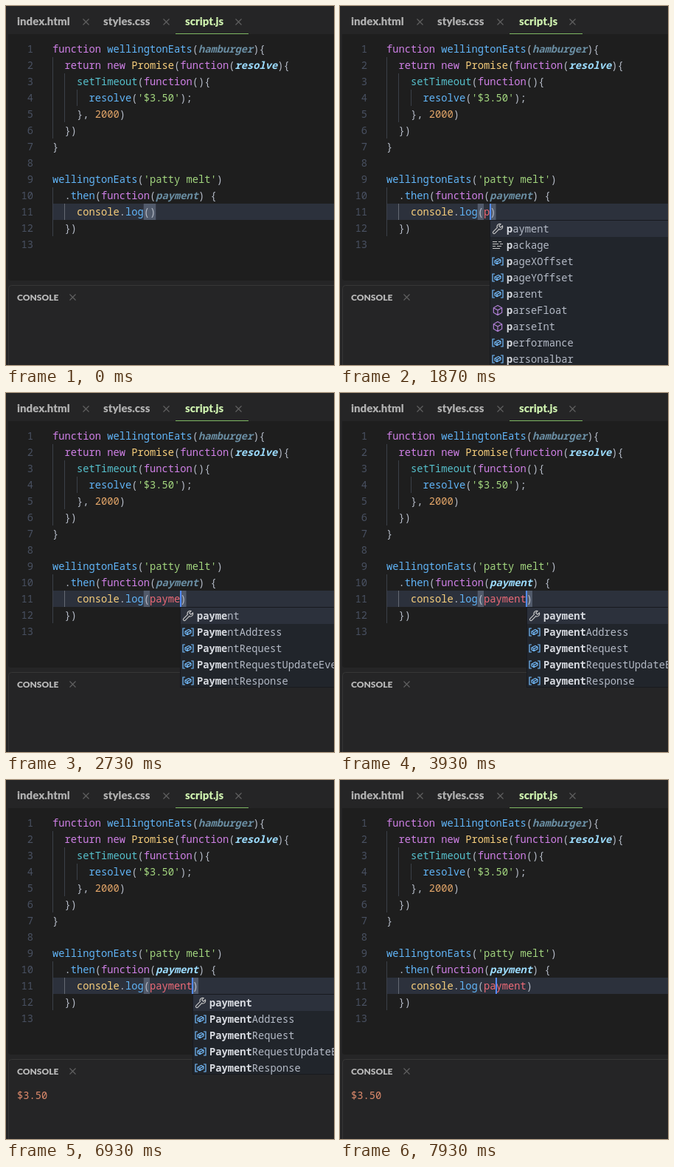
These frames come from a looping animation (445x485 px, 8 s). An HTML page with a canvas:

```html
<!DOCTYPE html>
<html lang="en">
<head>
<meta charset="utf-8">
<title>Promise demo</title>
<style>
html, body { margin: 0; width: 100%; height: 100%; overflow: hidden; background: #252526; }
canvas { display: block; width: 445px; height: 485px; }
</style>
</head>
<body>
<canvas id="stage"></canvas>
<script>
const W = 445, H = 485, LOOP = 8000;
const CH = 8.25, ROW = 22, LEFT = 63, TOP = 47;
const MONO = '13.75px "Noto Sans Mono", monospace';
const UI = 'Lato, sans-serif';
const C = {
  page: '#252526', editor: '#1e1e1e', line: '#2c313c', edge: '#363636',
  popup: '#21252b', border: '#181a1f', bracket: '#515a6b',
  plain: '#b4bac6', key: '#cf80e6', fn: '#61b5f8', type: '#f8cf7c',
  cyan: '#56c0cc', str: '#a3d67f', num: '#e0a468', red: '#ef6b78',
  arg: '#9cdcfe', dim: '#6a8ea3', lineNo: '#495162', caret: '#528bff'
};

const canvas = document.getElementById('stage');
const ctx = canvas.getContext('2d');
const dpr = window.devicePixelRatio || 1;
canvas.width = W * dpr;
canvas.height = H * dpr;

const colX = col => LEFT + col * CH;
const rowY = n => TOP + (n - 1) * ROW;

// Each token is [style, text]; each line is [indent, ...tokens].
const code = {
  1: [0, ['key', 'function '], ['fn', 'wellingtonEats'], ['plain', '('], ['dim', 'hamburger'], ['plain', '){']],
  2: [2, ['key', 'return new '], ['type', 'Promise'], ['plain', '('], ['key', 'function'], ['plain', '('], ['arg', 'resolve'], ['plain', '){']],
  3: [4, ['cyan', 'setTimeout'], ['plain', '('], ['key', 'function'], ['plain', '(){']],
  4: [6, ['fn', 'resolve'], ['plain', '('], ['str', "'$3.50'"], ['plain', ');']],
  5: [4, ['plain', '}, '], ['num', '2000'], ['plain', ')']],
  6: [2, ['plain', '})']],
  7: [0, ['plain', '}']],
  9: [0, ['fn', 'wellingtonEats'], ['plain', '('], ['str', "'patty melt'"], ['plain', ')']],
  12: [2, ['plain', '})']]
};

// [time, characters of "payment" typed]
const keys = [[1870, 1], [2130, 2], [2330, 3], [2530, 4], [2730, 5], [2800, 6], [2930, 7]];

const payItems = ['payment', 'PaymentAddress', 'PaymentRequest', 'PaymentRequestUpdateEvent', 'PaymentResponse'];
const lists = {
  1: ['payment', 'package', 'pageXOffset', 'pageYOffset', 'parent', 'parseFloat', 'parseInt', 'performance', 'personalbar'],
  2: ['payment', 'package', 'pageXOffset', 'pageYOffset', 'parent', 'parseFloat', 'parseInt', 'PannerNode', 'Path2D'],
  3: [...payItems, 'PerformanceEntry', 'PluginArray', 'PerformanceEntryList', 'PerformanceObserverEntryList']
};

function rect(x, y, w, h, color) {
  ctx.fillStyle = color;
  ctx.fillRect(x, y, w, h);
}

function text(str, x, y, color, font = MONO) {
  ctx.font = font;
  ctx.fillStyle = color;
  ctx.fillText(str, x, y);
}

function stroke(color, width, ...paths) {
  ctx.strokeStyle = color;
  ctx.lineWidth = width;
  ctx.beginPath();
  for (const [x, y, ...rest] of paths) {
    ctx.moveTo(x, y);
    for (let i = 0; i < rest.length; i += 2) ctx.lineTo(rest[i], rest[i + 1]);
  }
  ctx.stroke();
}

function panel(x, y, w, h, fill, edge) {
  ctx.beginPath();
  ctx.roundRect(x, y, w, h, 4);
  ctx.fillStyle = fill;
  ctx.fill();
  if (edge) {
    ctx.strokeStyle = edge;
    ctx.lineWidth = 1;
    ctx.stroke();
  }
}

function cross(x, y) {
  stroke('#626262', 1.1, [x - 4, y - 4, x + 4, y + 4], [x + 4, y - 4, x - 4, y + 4]);
}

function tokens(n, [indent, ...parts]) {
  let col = indent;
  for (const [style, str] of parts) {
    const slant = style === 'arg' || style === 'dim';
    text(str, colX(col), rowY(n) + 16, C[style], (slant ? 'italic 600 ' : '500 ') + MONO);
    col += str.length;
  }
}

function guide(col, from, to, color = '#3b4048') {
  rect(Math.floor(colX(col)), rowY(from), 1, (to - from + 1) * ROW, color);
}

function drawChrome() {
  rect(0, 0, W, H, C.page);
  panel(3, 38, W + 10, 333, C.editor);
  rect(3, 38, 8, 8, C.editor);
  panel(3.5, 377.5, W + 10, H, C.page, C.edge);

  const tabs = [['index.html', 15, 108.5], ['styles.css', 132, 217.5], ['script.js', 243, 315.5]];
  tabs.forEach(([name, x, closeX], i) => {
    text(name, x, 26, i === 2 ? '#cdf0ae' : '#b0b0b0', '900 15px ' + UI);
    cross(closeX, 21.5);
  });
  rect(230, 37, 99, 1, '#7fb863');
  text('CONSOLE', 15, 398, '#b8b8b8', '900 12px ' + UI);
  cross(90.5, 393.5);
}

function drawCode(s) {
  rect(LEFT, rowY(s.row), W - LEFT, ROW, C.line);
  guide(0, 2, 6);
  guide(2, 3, 5);
  guide(4, 4, 4);
  guide(0, 10, 12);
  guide(2, 11, 11, s.row === 11 ? '#646a73' : '#3b4048');

  if (s.matched) {
    for (const col of [15, 16 + s.typed]) rect(colX(col), rowY(11), CH, ROW, C.bracket);
  }
  for (let n = 1; n <= 13; n++) {
    const label = String(n);
    text(label, 37 - label.length * CH, rowY(n) + 16, C.lineNo);
    if (code[n]) tokens(n, code[n]);
  }
  tokens(10, [2, ['plain', '.'], ['fn', 'then'], ['plain', '('], ['key', 'function'], ['plain', '('],
    [s.used ? 'arg' : 'dim', 'payment'], ['plain', ') {']]);
  tokens(11, [4, ['type', 'console'], ['plain', '.'], ['fn', 'log'], ['plain', '('],
    ['red', 'payment'.slice(0, s.typed)], ['plain', ')']]);

  if (s.caret) rect(Math.floor(colX(s.col)), rowY(s.row), 2, ROW, C.caret);
}

function drawHint(alpha) {
  ctx.globalAlpha = alpha;
  rect(162, rowY(11), 3 * CH, ROW, '#343d4e');
  text('log', 162, rowY(11) + 16, C.fn, '500 ' + MONO);
  rect(162, 237, W, 30, C.popup);
  rect(162, 237, W, 1, C.border);
  text('(method) Console.log(...data: any[]): void', 171, 258, C.red, '500 ' + MONO);
  ctx.globalAlpha = 1;
}

function cube(x, y, r, color) {
  const a = r * 0.87, b = r / 2;
  stroke(color, 1.2,
    [x, y - r, x + a, y - b, x + a, y + b, x, y + r, x - a, y + b, x - a, y - b, x, y - r],
    [x - a, y - b, x, y, x + a, y - b], [x, y, x, y + r]);
}

function brick(x, y, color) {
  stroke(color, 1.2,
    [x + 1, y - 3.5, x + 4, y - 2, x + 4, y + 1, x - 1, y + 3.5, x - 4, y + 2, x - 4, y - 1, x + 1, y - 3.5],
    [x - 4, y - 1, x - 1, y + 0.5, x + 4, y - 2], [x - 1, y + 0.5, x - 1, y + 3.5]);
}

function wrench(x, y, color) {
  ctx.save();
  ctx.translate(x, y);
  ctx.rotate(Math.PI / 4);
  ctx.strokeStyle = color;
  ctx.lineWidth = 1.2;
  ctx.beginPath();
  ctx.moveTo(-1.6, -1);
  ctx.lineTo(-1.6, 7);
  ctx.arc(0, 7, 1.6, Math.PI, 0, true);
  ctx.lineTo(1.6, -1);
  ctx.arc(0, -4, 3.8, 0.9, -1.1, true);
  ctx.lineTo(1.5, -4);
  ctx.lineTo(-1.5, -4);
  ctx.arc(0, -4, 3.8, Math.PI + 1.1, Math.PI - 0.9, true);
  ctx.closePath();
  ctx.stroke();
  ctx.restore();
}

function icon(name, x, y) {
  if (name === 'payment') {
    wrench(x, y, '#c5c5c5');
  } else if (name === 'package') {
    stroke('#c5c5c5', 1.2, [x - 7, y - 4.5, x - 1, y - 4.5], [x + 1, y - 4.5, x + 5, y - 4.5],
      [x - 7, y - 1.5, x + 1, y - 1.5], [x + 3, y - 1.5, x + 7, y - 1.5],
      [x - 7, y + 1.5, x - 3, y + 1.5], [x - 1, y + 1.5, x + 5, y + 1.5],
      [x - 7, y + 4.5, x + 3, y + 4.5]);
  } else if (name.startsWith('parse')) {
    cube(x, y, 6.5, '#b180d7');
  } else {
    stroke('#75beff', 1.2, [x - 4, y - 5, x - 7, y - 5, x - 7, y + 5, x - 4, y + 5],
      [x + 4, y - 5, x + 7, y - 5, x + 7, y + 5, x + 4, y + 5]);
    brick(x, y, '#75beff');
  }
}

function drawPopup(typed) {
  const items = lists[typed] || payItems;
  const x = Math.round(colX(16 + typed));
  const query = 'payment'.slice(0, typed);
  const height = items.length * ROW - 1;
  rect(x, 289, W, height, C.border);
  rect(x + 1, 290, W, height - 2, C.popup);
  rect(x + 1, 290, W, ROW, C.line);

  items.forEach((name, i) => {
    const y = 290 + i * ROW;
    icon(name, x + 11, y + 11);
    let hit = 0;
    [...name].forEach((ch, k) => {
      const match = ch.toLowerCase() === query[hit];
      if (match) hit++;
      text(ch, x + 23 + k * CH, y + 16, match ? '#d7dae0' : C.plain, (match ? 'bold ' : '500 ') + MONO);
    });
  });
}

function stateAt(t) {
  let typed = 0;
  for (const [at, n] of keys) if (t >= at) typed = n;

  const s = { typed, row: 11, col: 16 + typed, used: t >= 3470, matched: t < 7130, caret: t >= 1530 };
  if (t >= 3470 && t < 7070) {
    s.caret = (t - 3470) % 1000 >= 460;
  } else if (t >= 7070 && t < 7930) {
    s.row = 13;
    s.col = 0;
    s.caret = t < 7530;
  } else if (t >= 7930) {
    s.col = 18;
  }
  s.popup = typed > 0 && t < 7070;
  s.hint = t < 800 || t >= 1000 ? 0 : t < 870 ? 0.3 : t < 930 ? 0.8 : 1;
  return s;
}

function draw(t) {
  const s = stateAt(t);
  ctx.setTransform(dpr, 0, 0, dpr, 0, 0);
  drawChrome();
  drawCode(s);
  if (t >= 5070) text('$3.50', 15, 431, '#dd8a6c', '500 ' + MONO);
  if (s.hint) drawHint(s.hint);
  if (s.popup) drawPopup(s.typed);
}

const start = performance.now();
function tick() {
  draw((performance.now() - start) % LOOP);
  requestAnimationFrame(tick);
}
tick();
</script>
</body>
</html>
```
